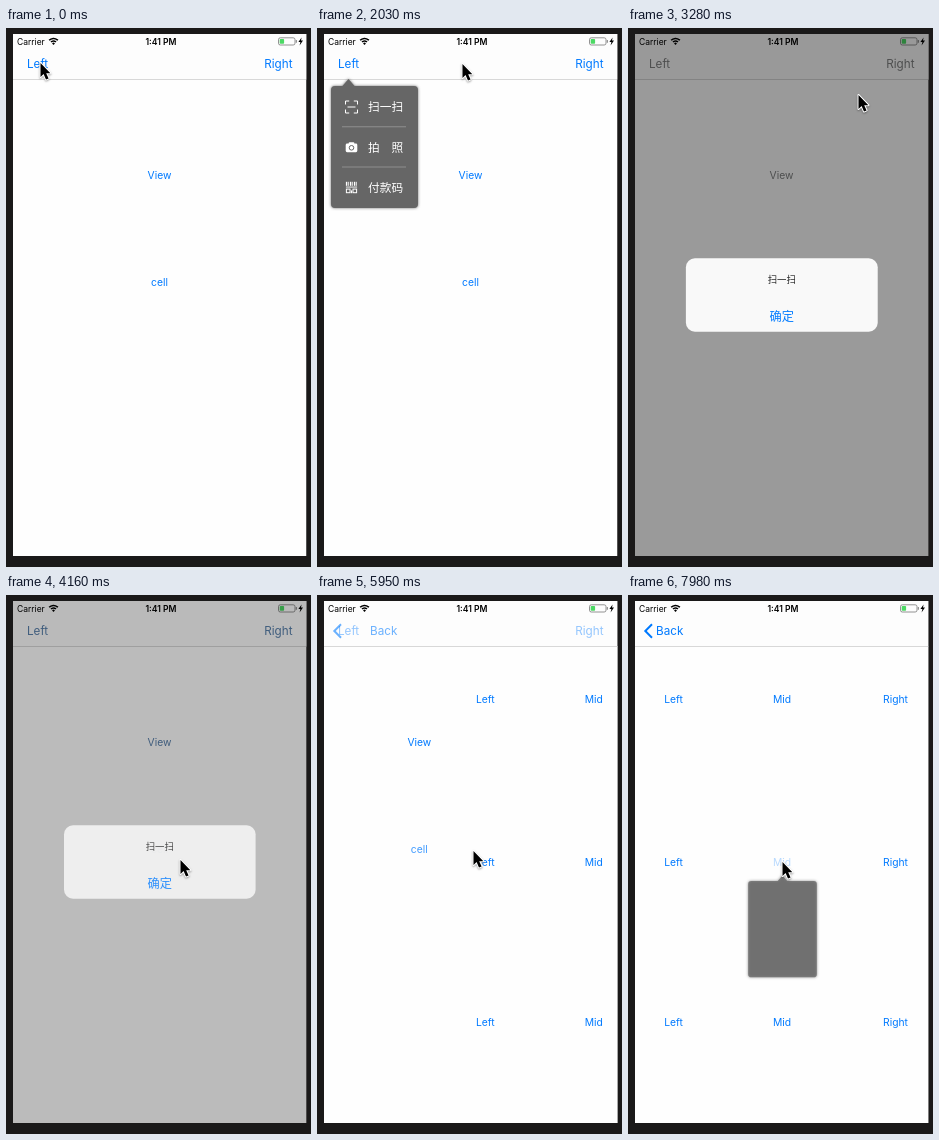
These frames come from a looping animation (305 px wide and 539 px high, 8000 ms). An HTML page with a canvas:

```html
<!DOCTYPE html>
<html lang="en">
<head>
<meta charset="utf-8">
<title>Popup menus</title>
<style>
  html, body { margin: 0; width: 100%; height: 100%; overflow: hidden; background: #1a1919; }
  canvas { display: block; width: 305px; height: 539px; }
</style>
</head>
<body>
<canvas></canvas>
<script>
const LOOP = 8000;
const SCREEN = { x: 7, y: 6, w: 293.5, h: 522 };
const MENU = { w: 87, h: 122, arrow: 7, time: 210 };
const LATIN = 'Inter, "Noto Sans CJK SC", "Noto Sans CJK", sans-serif';
const CJK = '"Noto Sans CJK SC", "Noto Sans CJK", sans-serif';

// Tip position, left edge when fully open, opening and closing times.
const menus = [
  { link: 'navLeft', x: 31.5, y: 51, left: 14, open: 365, close: 895 },
  { link: 'navLeft', x: 31.5, y: 51, left: 14, open: 1780, close: 2140 },
  { link: 'navRight', x: 272, y: 51, left: 208, open: 2475, close: 2880 },
  { link: 'navRight', x: 272, y: 51, left: 208, open: 4540, close: 5020 },
  { link: 'cell00', x: 45.5, y: 117.5, left: 24, open: 6740, close: 7440 },
  { link: 'cell11', x: 154.5, y: 280.5, left: 111, open: 7837, close: 9000 },
];
const presses = [...menus, { link: 'cell', open: 5760 }];

const cursorPath = [
  [0, 34, 35], [810, 34, 35], [890, 126, 36], [980, 158, 45], [1110, 161, 41],
  [1570, 161, 41], [1740, 34, 36], [1900, 34, 36], [2120, 207, 36], [2300, 243, 34],
  [2390, 243, 34], [2460, 268, 38], [2560, 268, 38], [2780, 230, 67], [3330, 230, 67],
  [3700, 172, 281], [4030, 172, 281], [4140, 174, 265], [4210, 174, 265],
  [4480, 270, 38], [4620, 270, 38], [4800, 262, 60], [4840, 262, 60], [5000, 216, 279],
  [5100, 216, 279], [5320, 190, 308], [5600, 172, 260], [5650, 172, 260],
  [5730, 156, 256], [5950, 156, 256], [6380, 55, 106], [6800, 55, 106],
  [7050, 62, 150], [7330, 62, 150], [7430, 120, 200], [7520, 120, 200],
  [7740, 154, 267], [8000, 154, 267],
];

const canvas = document.querySelector('canvas');
const ctx = canvas.getContext('2d');
const ratio = window.devicePixelRatio || 1;
canvas.width = 305 * ratio;
canvas.height = 539 * ratio;

const ramp = (t, start, length) => Math.min(1, Math.max(0, (t - start) / length));
const smooth = p => p * p * (3 - 2 * p);
const ease = (t, start, length) => smooth(ramp(t, start, length));
const mix = (a, b, p) => a + (b - a) * p;

function withState(draw, alpha = 1) {
  ctx.save();
  ctx.globalAlpha *= alpha;
  draw();
  ctx.restore();
}

function rect(x, y, w, h, color) {
  ctx.fillStyle = color;
  ctx.fillRect(x, y, w, h);
}

function roundRect(x, y, w, h, r, color) {
  ctx.fillStyle = color;
  ctx.beginPath();
  ctx.roundRect(x, y, w, h, r);
  ctx.fill();
}

function polyline(points, close) {
  ctx.beginPath();
  points.forEach(([x, y]) => ctx.lineTo(x, y));
  if (close) ctx.closePath();
}

// The y coordinate is the vertical middle of the capitals.
function text(label, x, y, size, color, { align = 'center', family = LATIN, weight = 400 } = {}) {
  ctx.font = `${weight} ${size}px ${family}`;
  ctx.textAlign = align;
  ctx.fillStyle = color;
  ctx.fillText(label, x, y + size * 0.37);
}

function pressAlpha(t, id) {
  const press = presses.find(p => p.link === id && t >= p.open - 5 && t < p.open + 220);
  return press ? mix(0.28, 1, ramp(t, press.open + 145, 70)) : 1;
}

function linkColor(dim) {
  const [r, g, b] = [[0, 128], [122, 128], [255, 128]].map(([a, z]) => Math.round(mix(a, z, dim)));
  return `rgb(${r},${g},${b})`;
}

function link(t, id, label, x, y, size, color, alpha = 1, align) {
  withState(() => text(label, x, y, size, color, { align }), alpha * pressAlpha(t, id));
}

function drawPages(t, push, color, alertAlpha) {
  rect(SCREEN.x, SCREEN.y, SCREEN.w, SCREEN.h, '#fefefe');
  if (push < 1) withState(() => {
    ctx.translate(-0.3 * SCREEN.w * push, 0);
    link(t, 'view', 'View', 153.5, 147.5, 10.3, color);
    link(t, 'cell', 'cell', 153.5, 254, 10.3, color, 1 - alertAlpha);
  });
  if (push > 0) withState(() => {
    ctx.translate(SCREEN.w * (1 - push), 0);
    rect(SCREEN.x, 51, SCREEN.w, 477, '#fefefe');
    [104, 267.5, 427.5].forEach((y, row) =>
      ['Left', 'Mid', 'Right'].forEach((label, col) =>
        link(t, `cell${row}${col}`, label, [45.5, 154, 267.5][col], y, 10.3, color)));
  });
}

function drawNavBar(t, push, color) {
  rect(SCREEN.x, SCREEN.y, SCREEN.w, 45, '#fdfdfd');
  rect(SCREEN.x, 51, SCREEN.w, 0.8, '#cfcfcf');
  link(t, 'navLeft', 'Left', 21, 36, 11.7, color, 1 - push, 'left');
  link(t, 'navRight', 'Right', 286.5, 36, 11.7, color, 1 - push, 'right');
  withState(() => {
    ctx.strokeStyle = color;
    ctx.lineWidth = 2;
    polyline([[24, 29.2], [17.3, 36], [24, 42.8]]);
    ctx.stroke();
    text('Back', 28 + 60 * (1 - push), 36, 11.7, color, { align: 'left' });
  }, push);
}

function drawStatusBar() {
  text('Carrier', 11, 13.5, 8.5, '#000', { align: 'left' });
  text('1:41 PM', 155, 13.5, 8.6, '#000', { weight: 600 });
  ctx.strokeStyle = '#000';
  ctx.lineWidth = 1.5;
  [5.8, 3.3].forEach(r => {
    ctx.beginPath();
    ctx.arc(47.5, 16.2, r, -Math.PI * 0.77, -Math.PI * 0.23);
    ctx.stroke();
  });
  ctx.fillStyle = '#000';
  ctx.beginPath();
  ctx.moveTo(47.5, 17);
  ctx.arc(47.5, 16.4, 1.7, -Math.PI * 0.8, -Math.PI * 0.2);
  ctx.fill();
  polyline([[295.6, 9.5], [292.4, 14], [294.4, 14], [293.6, 17.5], [297, 12.6], [295, 12.6]], true);
  ctx.fill();
}

function drawBattery() {
  ctx.strokeStyle = '#777';
  ctx.lineWidth = 0.8;
  ctx.beginPath();
  ctx.roundRect(272.5, 9.8, 16.5, 7.2, 1.8);
  ctx.stroke();
  roundRect(273.7, 11, 4.4, 4.8, 0.8, '#4cd964');
  roundRect(289.8, 12.1, 1, 2.6, 0.5, '#777');
}

// Icons are centred on the origin and about 13 px wide.
const icons = [
  function scan() {
    for (const sx of [-1, 1]) for (const sy of [-1, 1]) {
      polyline([[sx * 6, sy * 2.5], [sx * 6, sy * 6], [sx * 2.3, sy * 6]]);
      ctx.stroke();
    }
    rect(-4, -0.5, 8, 1, '#fff');
  },
  function camera() {
    roundRect(-5.8, -3.6, 11.6, 8.6, 1.4, '#fff');
    roundRect(-2.8, -5, 5.6, 3, 0.8, '#fff');
    ctx.strokeStyle = '#666';
    ctx.beginPath();
    ctx.arc(0, 0.6, 2.3, 0, Math.PI * 2);
    ctx.stroke();
  },
  function payment() {
    for (let i = 0; i < 6; i++) rect(-5.6 + i * 2, -5.6, i % 2 ? 0.8 : 1.4, 4, '#fff');
    rect(-5.6, -0.8, 11.2, 0.9, '#fff');
    ctx.strokeRect(-5.1, 1.7, 3.6, 3.6);
    ctx.strokeRect(1.5, 1.7, 3.6, 3.6);
    rect(-0.6, 3, 1.2, 2.8, '#fff');
  },
];

function drawMenuItems(left, top) {
  ['扫一扫', '拍　照', '付款码'].forEach((label, i) => {
    const y = top + 21 + i * 40.2;
    withState(() => {
      ctx.translate(left + 20.5, y);
      ctx.strokeStyle = '#fff';
      ctx.lineWidth = 1;
      icons[i]();
    });
    text(label, left + 37, y, 11.7, '#fff', { align: 'left', family: CJK });
    if (i) rect(left + 11, y - 20.8, 64, 0.8, '#999');
  });
}

function drawMenu(t, menu) {
  const shown = ease(t, menu.open, MENU.time) - ease(t, menu.close, MENU.time);
  if (shown <= 0) return;
  withState(() => {
    const scale = mix(0.1, 1, shown);
    const { x, y, left } = menu;
    const top = y + MENU.arrow;
    ctx.translate(x, y);
    ctx.scale(scale, scale);
    ctx.translate(-x, -y);
    ctx.fillStyle = '#666';
    ctx.shadowColor = 'rgba(60,60,60,.75)';
    ctx.shadowBlur = 3 * ratio;
    ctx.beginPath();
    ctx.roundRect(left, top, MENU.w, MENU.h, 4);
    ctx.moveTo(x, y);
    ctx.lineTo(x + 6.5, top + 0.5);
    ctx.lineTo(x - 6.5, top + 0.5);
    ctx.closePath();
    ctx.fill();
    ctx.shadowColor = 'transparent';
    if (shown === 1) drawMenuItems(left, top);
  }, shown);
}

function drawAlert(t, alpha) {
  if (alpha <= 0) return;
  withState(() => {
    const scale = mix(1.15, 1, ease(t, 2950, 350));
    ctx.translate(153.8, 267);
    ctx.scale(scale, scale);
    ctx.translate(-153.8, -267);
    roundRect(58, 230.3, 191.6, 73.4, 9, '#f9f9f9');
    text('扫一扫', 153.8, 252, 9.4, '#222', { family: CJK });
    text('确定', 153.8, 288.3, 12.2, '#007aff', { family: CJK });
  }, alpha);
}

function drawCursor(t) {
  const next = Math.max(1, cursorPath.findIndex(key => key[0] > t));
  const [t0, x0, y0] = cursorPath[next - 1];
  const [t1, x1, y1] = cursorPath[next];
  const p = ease(t, t0, t1 - t0);
  withState(() => {
    ctx.translate(mix(x0, x1, p), mix(y0, y1, p));
    polyline([[0.5, 0], [0.5, 14], [3.6, 11], [6, 16.5], [8.6, 15.4], [6.2, 10.2], [10.4, 10.2]], true);
    ctx.shadowColor = 'rgba(0,0,0,.35)';
    ctx.shadowBlur = 2 * ratio;
    ctx.shadowOffsetY = ratio;
    ctx.lineJoin = 'round';
    ctx.lineWidth = 2;
    ctx.strokeStyle = '#fff';
    ctx.stroke();
    ctx.shadowColor = 'transparent';
    ctx.fillStyle = '#000';
    ctx.fill();
  });
}

function draw(t) {
  const push = 1 - (1 - ramp(t, 5820, 520)) ** 3;
  const dim = ease(t, 2950, 350) - ease(t, 4030, 340);
  const alertAlpha = Math.sqrt(Math.max(0, dim));
  const color = linkColor(dim);

  ctx.setTransform(ratio, 0, 0, ratio, 0, 0);
  rect(0, 0, 305, 539, '#1a1919');
  withState(() => {
    ctx.beginPath();
    ctx.rect(SCREEN.x, SCREEN.y, SCREEN.w, SCREEN.h);
    ctx.clip();
    drawPages(t, push, color, alertAlpha);
    drawNavBar(t, push, color);
    drawBattery();
    menus.forEach(menu => drawMenu(t, menu));
    rect(SCREEN.x, SCREEN.y, SCREEN.w, SCREEN.h, `rgba(0,0,0,${0.4 * dim})`);
    drawStatusBar();
    drawAlert(t, alertAlpha);
    drawCursor(t);
  });
}

const start = performance.now();
function tick() {
  draw((performance.now() - start) % LOOP);
  requestAnimationFrame(tick);
}
tick();
</script>
</body>
</html>
```
